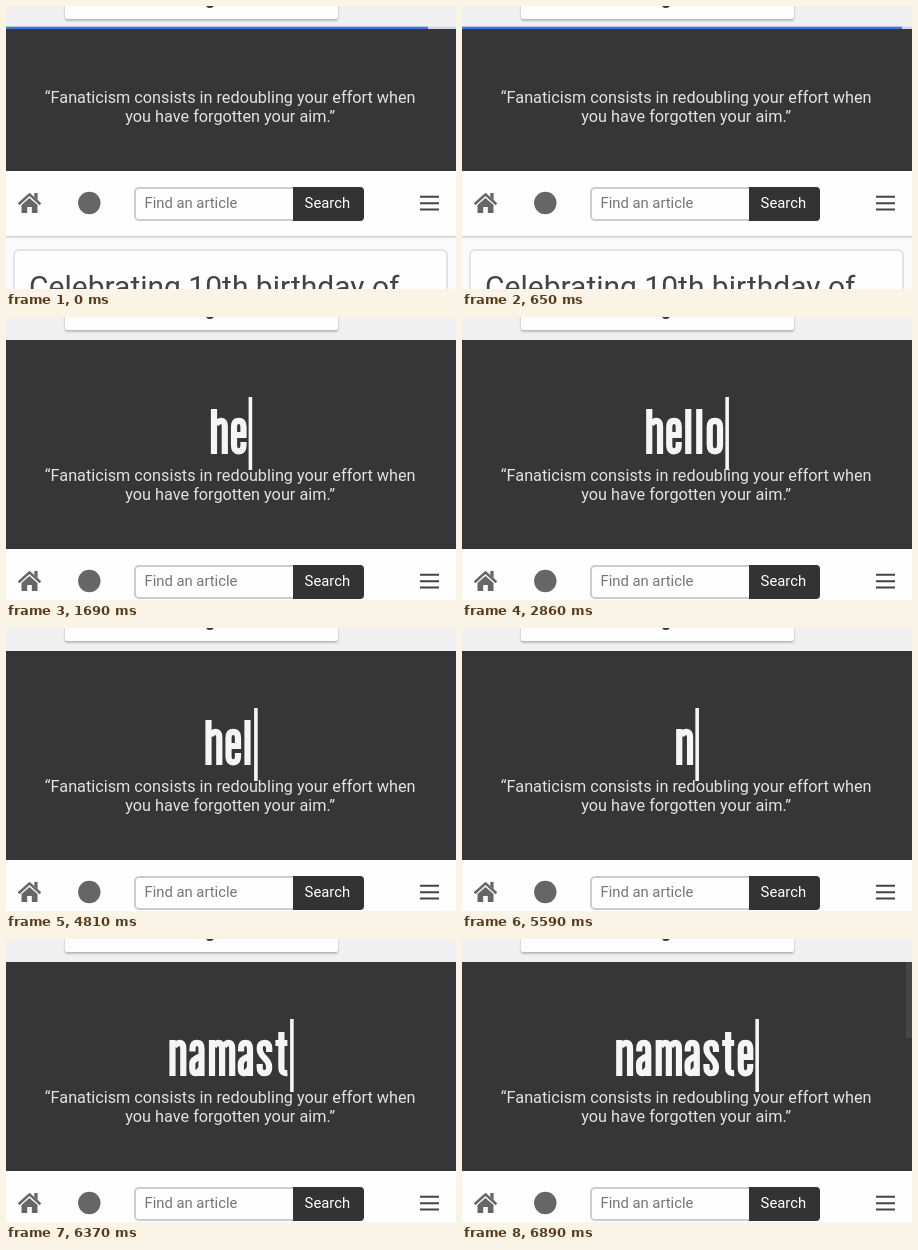
Write an HTML page that moves like this. It is 450x283 px and loops after 8000 ms.

```html
<!DOCTYPE html>
<html lang="en">
<head>
<meta charset="utf-8">
<title>Typed greeting</title>
<style>
  html, body { margin: 0; height: 100%; overflow: hidden; background: #f0f0f0; }
  svg { display: block; width: 100%; height: 100%; font-family: Roboto, sans-serif; }
  #word { fill: none; stroke: #f5f5f5; stroke-width: 6.2; }
</style>
</head>
<body>
<svg viewBox="0 0 450 283">
  <defs>
    <filter id="soft" x="-10%" y="-50%" width="120%" height="200%">
      <feGaussianBlur stdDeviation="1.3"/>
    </filter>
  </defs>

  <!-- browser bar -->
  <rect width="450" height="24" fill="#f0f0f0"/>
  <rect x="59" y="-10" width="273" height="24.5" rx="2" fill="#aaa" filter="url(#soft)"/>
  <rect x="59" y="-10" width="273" height="23" rx="2" fill="#fdfdfd"/>
  <text x="204" y="-1.5" font-size="17" font-weight="700" fill="#333" text-anchor="middle">g</text>
  <g id="progress">
    <rect y="20.7" width="450" height="2.3" fill="#ccd6e6"/>
    <rect id="bar" y="20.7" height="2.3" fill="#3c78dc"/>
  </g>

  <!-- banner -->
  <rect y="23" width="450" height="260" fill="#363636"/>
  <g id="title" role="img">
    <g id="word"></g>
    <rect id="caret" y="80" width="3.6" height="73" fill="#f5f5f5"/>
  </g>

  <g id="content">
    <g font-size="16.25" fill="#e2e2e2" text-anchor="middle">
      <text x="224.2" y="97">“Fanaticism consists in redoubling your effort when</text>
      <text x="224.2" y="116">you have forgotten your aim.”</text>
    </g>

    <rect y="165" width="450" height="120" fill="#fafafa"/>
    <rect x="-5" y="170" width="460" height="61" fill="#bbb" filter="url(#soft)"/>
    <rect y="165" width="450" height="65" fill="#fefefe"/>

    <!-- home -->
    <g fill="#666">
      <path d="M15.5 199 L23.5 192 L31.5 199 V207 H25.8 V201 H21.2 V207 H15.5Z"/>
      <path d="M28.3 187 H31.6 V194 L28.3 191Z"/>
      <path d="M12.6 198.3 L23.5 188.4 L34.4 198.3" fill="none" stroke="#666" stroke-width="2.5"/>
    </g>
    <circle cx="83.3" cy="197" r="11.2" fill="#666"/>

    <!-- search -->
    <rect x="129" y="182" width="164" height="32" rx="4" fill="#fefefe" stroke="#ccc" stroke-width="2"/>
    <path d="M287 181 H354 Q358 181 358 185 V211 Q358 215 354 215 H287Z" fill="#333"/>
    <g font-size="14.8">
      <text x="138.5" y="202.3" fill="#757575">Find an article</text>
      <text x="298.6" y="202.3" fill="#fff">Search</text>
    </g>
    <path d="M414 190.8 H433 M414 197.2 H433 M414 203.6 H433" stroke="#444" stroke-width="2"/>

    <!-- article card -->
    <rect x="8" y="244" width="433" height="60" rx="5" fill="#fefefe" stroke="#ddd" stroke-width="1.6"/>
    <text x="23" y="290.5" font-size="30" fill="#444">Celebrating 10th birthday of</text>
  </g>
  <rect id="scrollbar" x="444" y="23" width="6" height="76" fill="#fff"/>
</svg>

<script>
const LOOP = 8000, BASELINE = 137, HEADLINE_HEIGHT = 67;
const SVG_NS = "http://www.w3.org/2000/svg";
const $ = id => document.getElementById(id);

// Condensed lettering: advance width and centre-line stroke, baseline at 0.
const ARCH = "M7 -30 Q10 -33.2 12.5 -33.2 Q15.9 -33 15.9 -27.5 V0";
const GLYPHS = {
  h: [20.5, "M5.1 0 V-45 " + ARCH],
  n: [20.5, "M5.1 0 V-36 " + ARCH],
  m: [29.5, "M5.1 0 V-36 M7 -30 Q9.5 -33.2 12 -33.2 Q15.2 -33 15.2 -27.5 V0 M17 -30 Q19.5 -33.2 22 -33.2 Q25.3 -33 25.3 -27.5 V0"],
  e: [18.5, "M4.6 -19 H14.1 V-27 Q14.1 -33.2 9.35 -33.2 T4.6 -27 V-8.8 Q4.6 -2.7 9.35 -2.7 T14.1 -8.8 V-12"],
  l: [11, "M5.1 0 V-45"],
  o: [19.5, "M4.6 -18 V-27 Q4.6 -33.2 9.75 -33.2 T14.9 -27 V-9 Q14.9 -2.7 9.75 -2.7 T4.6 -9Z"],
  a: [19, "M4.6 -24.5 V-27 Q4.6 -33.2 9.1 -33.2 T13.6 -27 V0 M13.6 -20 Q4.4 -17 4.4 -12 V-7.5 Q4.4 -2.8 7.5 -2.8 Q10.5 -3 13.6 -8"],
  s: [19, "M13.8 -24 V-27.5 Q13.8 -33.2 9 -33.2 T4.3 -27.5 C4.3 -18 13.8 -18 13.8 -9 Q13.8 -2.8 9 -2.8 T4.3 -9 V-12"],
  t: [15, "M7 -44 V-7.5 Q7 -2.5 13 -2.8 M1 -33 H13"]
};

// Each track lists [start time, value]; values hold until the next entry.
const TYPED = [
  [0, ""], [910, "h"], [1690, "he"], [2340, "hel"], [2600, "hell"], [2860, "hello"],
  [4810, "hel"], [4940, "h"], [5070, ""],
  [5590, "n"], [5720, "na"], [5850, "nam"],
  [6110, "nama"], [6240, "namas"], [6370, "namast"], [6500, "namaste"]
];
const LOADED = [[0, 422], [520, 431], [650, 440], [910, 450]];
const BAR_OPACITY = [[0, 1], [1040, 0.5], [1170, 0]];
const SCROLLBAR_OPACITY = [[0, 0], [6760, 0.04], [6890, 0.08]];

const valueAt = (track, t) => track.findLast(([start]) => start <= t)[1];

let shownWord = null;
function showWord(word) {
  if (word === shownWord) return;
  shownWord = word;
  const width = [...word].reduce((sum, letter) => sum + GLYPHS[letter][0], 0);
  let x = 222.4 - width / 2;
  $("word").replaceChildren(...[...word].map(letter => {
    const [advance, d] = GLYPHS[letter];
    const path = document.createElementNS(SVG_NS, "path");
    path.setAttribute("d", d);
    path.setAttribute("transform", `translate(${x} ${BASELINE})`);
    x += advance;
    return path;
  }));
  $("caret").setAttribute("x", x + 0.7);
  $("title").setAttribute("aria-label", word);
}

function draw() {
  const t = performance.now() % LOOP;
  const started = t >= 910;
  showWord(valueAt(TYPED, t));
  $("title").style.display = started ? "" : "none";
  $("content").setAttribute("transform", `translate(0 ${started ? HEADLINE_HEIGHT : 0})`);
  $("bar").setAttribute("width", valueAt(LOADED, t));
  $("progress").setAttribute("opacity", valueAt(BAR_OPACITY, t));
  $("scrollbar").setAttribute("opacity", valueAt(SCROLLBAR_OPACITY, t));
  requestAnimationFrame(draw);
}
draw();
</script>
</body>
</html>
```
